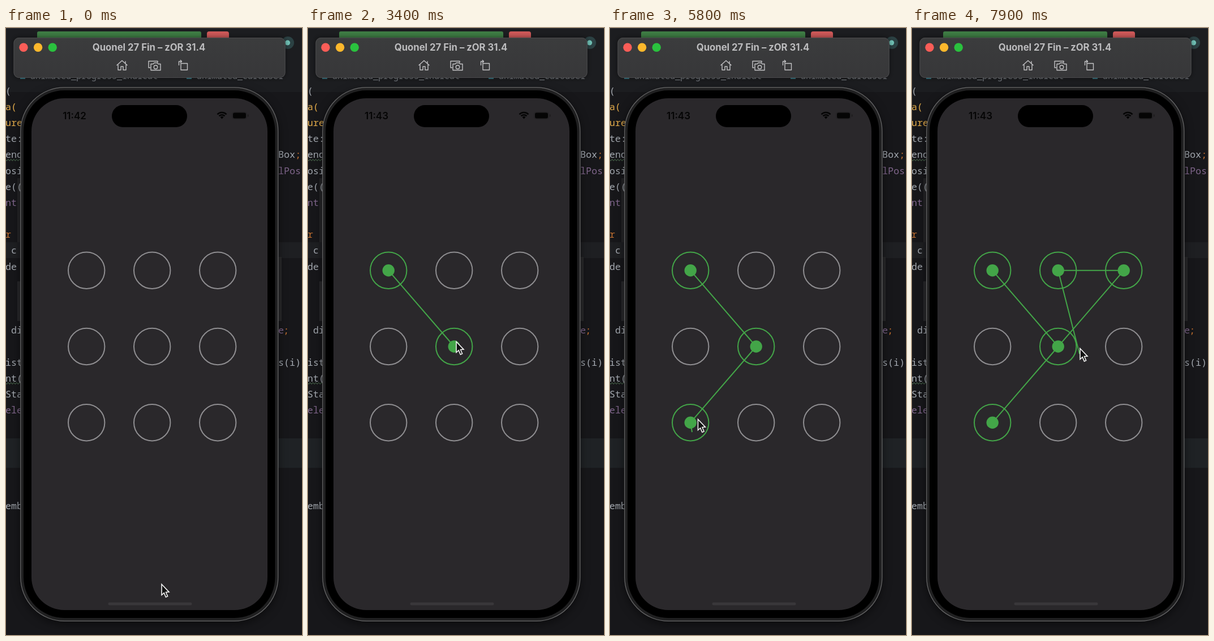
An HTML page with a canvas that plays this animation: 523 px wide and 1071 px high, repeating every 8 s.

```html
<!DOCTYPE html>
<html lang="en">
<head>
<meta charset="utf-8">
<title>Pattern lock</title>
<style>
html, body { margin: 0; width: 100%; height: 100%; overflow: hidden; background: #17171a; }
canvas { display: block; width: 523px; height: 1071px; }
</style>
</head>
<body>
<canvas id="stage"></canvas>
<script>
const W = 523, H = 1071, LOOP = 8000, STEP = 100;
const GREEN = '#43a548', GREY = '#8f8e91', INK = '#050505', ICON = '#c2c2c4';
const canvas = document.getElementById('stage');
const ratio = window.devicePixelRatio || 1;
canvas.width = W * ratio;
canvas.height = H * ratio;
const c = canvas.getContext('2d');
c.scale(ratio, ratio);

const dots = Array.from({ length: 9 }, (_, i) => ({
  x: 142.2 + 116 * (i % 3),
  y: 427.8 + 134.2 * Math.floor(i / 3)
}));
const HIT = 33, PRESS = 1500;

// Key points of the pointer tip
const path = [
  { t: 300, x: 274, y: 980 },
  { t: 1300, x: 134, y: 419 },
  { t: 1700, x: 136, y: 421 },
  { t: 2200, x: 182, y: 459 },
  { t: 3400, x: 261, y: 552 },
  { t: 3500, x: 261, y: 552 },
  { t: 4800, x: 145, y: 702 },
  { t: 5700, x: 145, y: 702 },
  { t: 6500, x: 365, y: 401 },
  { t: 6600, x: 333, y: 405 },
  { t: 7050, x: 258, y: 417 },
  { t: 7800, x: 296, y: 564 }
];

const slope = (i, k) => (path[i + 1][k] - path[i][k]) / (path[i + 1].t - path[i].t);

function tangent(i, k) {
  if (i === 0 || i === path.length - 1) return 0;
  const a = slope(i - 1, k), b = slope(i, k);
  return a * b <= 0 ? 0 : 2 * a * b / (a + b);
}

// Monotone cubic through the key points, resting before and after
function pointer(t) {
  let i = 0;
  while (i < path.length - 2 && t >= path[i + 1].t) i++;
  const a = path[i], b = path[i + 1], d = b.t - a.t;
  const u = Math.min(1, Math.max(0, (t - a.t) / d)), v = 1 - u;
  const axis = k =>
    v * v * (1 + 2 * u) * a[k] + u * u * (3 - 2 * u) * b[k] +
    u * v * d * (v * tangent(i, k) - u * tangent(i + 1, k));
  return { x: axis('x'), y: axis('y') };
}

// The touch trails the pointer by one step
function touch(t) {
  const p = pointer(t - STEP);
  return { x: p.x, y: p.y + 11 };
}

function chain(t) {
  const hit = [];
  for (let s = PRESS; s <= t; s += STEP) {
    const p = touch(s);
    for (const d of dots)
      if (!hit.includes(d) && Math.hypot(d.x - p.x, d.y - p.y) < HIT) hit.push(d);
  }
  return hit;
}

function rect(x, y, w, h, color) {
  c.fillStyle = color;
  c.fillRect(x, y, w, h);
}

function round(x, y, w, h, r, fill, stroke, width = 1) {
  c.beginPath();
  c.roundRect(x, y, w, h, r);
  if (fill) { c.fillStyle = fill; c.fill(); }
  if (stroke) { c.strokeStyle = stroke; c.lineWidth = width; c.stroke(); }
}

function disc(x, y, r, color) {
  c.beginPath();
  c.arc(x, y, r, 0, 7);
  c.fillStyle = color;
  c.fill();
}

function ring(x, y, r, color, width) {
  c.beginPath();
  c.arc(x, y, r, 0, 7);
  c.strokeStyle = color;
  c.lineWidth = width;
  c.stroke();
}

function text(s, x, y, color, font, align = 'left') {
  c.font = font;
  c.textAlign = align;
  c.fillStyle = color;
  c.fillText(s, x, y);
}

function shadowed(blur, dy, paint) {
  c.save();
  c.shadowColor = 'rgba(0,0,0,.5)';
  c.shadowBlur = blur * ratio;
  c.shadowOffsetY = dy * ratio;
  paint();
  c.restore();
}

// One source line per entry; the first letter picks the colour
const MONO = '"Noto Sans Mono", "DejaVu Sans Mono", monospace';
const tint = { w: '#a3a8af', p: '#80668c', o: '#c4702f', y: '#e2ab4a' };
const leftCode = 'w(|ya(|yure|wte:|wend|wosi|we((|pnt||or|w c|wde||||w di||wist|wnt(|wSta|pele||||||wemb';
const rightCode = '||||wBox|plPos||||||||||pe||ws(i)';

function column(source, x) {
  source.split('|').forEach((line, i) =>
    text(line.slice(1), x, 116.7 + 28.17 * i, tint[line[0]], `500 16.7px ${MONO}`));
}

function squiggle(y) {
  c.beginPath();
  for (let x = 0; x <= 25; x++) c.lineTo(x, y + 1.4 * Math.sin(x * 1.25));
  c.strokeStyle = '#4e7050';
  c.lineWidth = 1;
  c.stroke();
}

function tab(x, name) {
  rect(x - 18, 82, 9, 8, '#367582');
  text(name, x, 90, '#7c8086', `15px ${MONO}`);
}

function editor() {
  rect(0, 0, W, H, '#17171a');
  rect(0, 0, W, 113, '#1c1d20');
  rect(0, 0, W, 1, '#303134');
  rect(0, 378, W, 28, '#1e1f22');
  rect(0, 724, W, 52, '#1f2225');
  rect(20, 265, 6, 113, '#252527');
  rect(20, 447, 6, 70, '#29292b');
  rect(478, 404, 9, 113, '#29292b');
  round(55, 6, 290, 14, 3, '#3e7c44');
  round(355, 6, 39, 14, 4, '#cd5858');
  disc(498, 26, 11, '#2b4143');
  disc(497.5, 26, 4.5, '#72c4b8');
  tab(43, 'animated_progress_indicat');
  tab(337, 'animated_carousel');
  column(leftCode, -1);
  column(rightCode, 481);
  text(';', 511, 229.4, tint.o, `500 16.7px ${MONO}`);
  text(';', 490, 539.3, tint.o, `500 16.7px ${MONO}`);
  squiggle(233);
  squiggle(627);
}

const icons = new Path2D(
  'M195.5 66l9.5-8.5 9.5 8.5M198 64.5V74h5v-6h4v6h5v-9.5M211 62.5v-4' +
  'M255 70h-3V58.5h16V61M256 63.5h4l2-2h5l2 2h4v11h-17z' +
  'M309 62.5h11.5V74H309zM305.5 66v-7h4.500M308 56.500l2.500 2.500-2.500 2.500');

function toolbar() {
  const shade = c.createLinearGradient(0, 17, 0, 88);
  shade.addColorStop(0, '#3b3c3d');
  shade.addColorStop(1, '#373739');
  shadowed(10, 0, () => round(13.5, 17, 480, 71, 9, shade));
  round(14, 17.5, 479, 70, 9, null, '#4b4b4d');
  ['#fb5d57', '#fcb82c', '#2ac13e'].forEach((color, i) => disc(31 + 25.6 * i, 34.3, 7.7, color));
  text('Quonel 27 Fin – zOR 31.4', 252.5, 39.8, '#bcbcbe', '700 16.7px Inter, sans-serif', 'center');
  c.strokeStyle = ICON;
  c.lineWidth = 1.4;
  c.lineJoin = 'round';
  c.stroke(icons);
  ring(264.5, 69, 3.2, ICON, 1.4);
}

function statusBar(t) {
  text(t < 200 ? '11:42' : '11:43', 121, 161, INK, '600 17px Inter, sans-serif', 'center');
  round(187, 136, 133, 39, 19.5, '#000');
  const fan = [-Math.PI * 0.76, -Math.PI * 0.24];
  c.strokeStyle = c.fillStyle = INK;
  c.lineWidth = 2.5;
  for (const r of [4, 6.8, 11]) {
    c.beginPath();
    if (r === 4) c.moveTo(381.5, 160.5);
    c.arc(381.5, 160, r, ...fan);
    if (r === 4) c.fill(); else c.stroke();
  }
  round(399.5, 148.5, 26, 12, 4, null, '#222123');
  round(401, 149.5, 23, 10, 3, INK);
  rect(427, 152.5, 1.5, 4, '#1c1b1d');
}

function phone(t) {
  shadowed(16, 5, () => round(25.5, 104.5, 455.5, 942, 77.5, '#202021'));
  round(25.8, 104.8, 455, 941.6, 77.5, null, '#69696a', 1.2);
  round(31, 110, 444.5, 931, 72, '#000');
  round(45, 124, 417, 903, 58, '#2a282b');
  statusBar(t);
  round(180.5, 1013.5, 148, 5, 2.5, '#39373a');
}

function pattern(t) {
  const hit = chain(t);
  for (const d of dots) {
    const on = hit.includes(d);
    ring(d.x, d.y, 32.2, on ? GREEN : GREY, 2);
    if (on) disc(d.x, d.y, 10.7, GREEN);
  }
  if (!hit.length) return;
  c.beginPath();
  for (const p of [...hit, touch(t)]) c.lineTo(p.x, p.y);
  c.strokeStyle = GREEN;
  c.lineWidth = 2;
  c.stroke();
}

const arrow = new Path2D('M1 1.500v19l4.200-3.800 3.200 7.400 3.200-1.400-3.100-7.200 5.500-.4z');

function cursor(t) {
  const p = pointer(t);
  c.save();
  c.translate(p.x, p.y);
  c.lineJoin = 'miter';
  c.fillStyle = '#111';
  c.fill(arrow);
  c.strokeStyle = '#f2f2f2';
  c.lineWidth = 1.6;
  c.stroke(arrow);
  c.restore();
}

function draw(now) {
  const t = Math.floor((now % LOOP) / STEP) * STEP;
  editor();
  phone(t);
  toolbar();
  pattern(t);
  cursor(t);
}

const start = performance.now();
function tick() {
  draw(performance.now() - start);
  requestAnimationFrame(tick);
}
tick();
</script>
</body>
</html>
```
